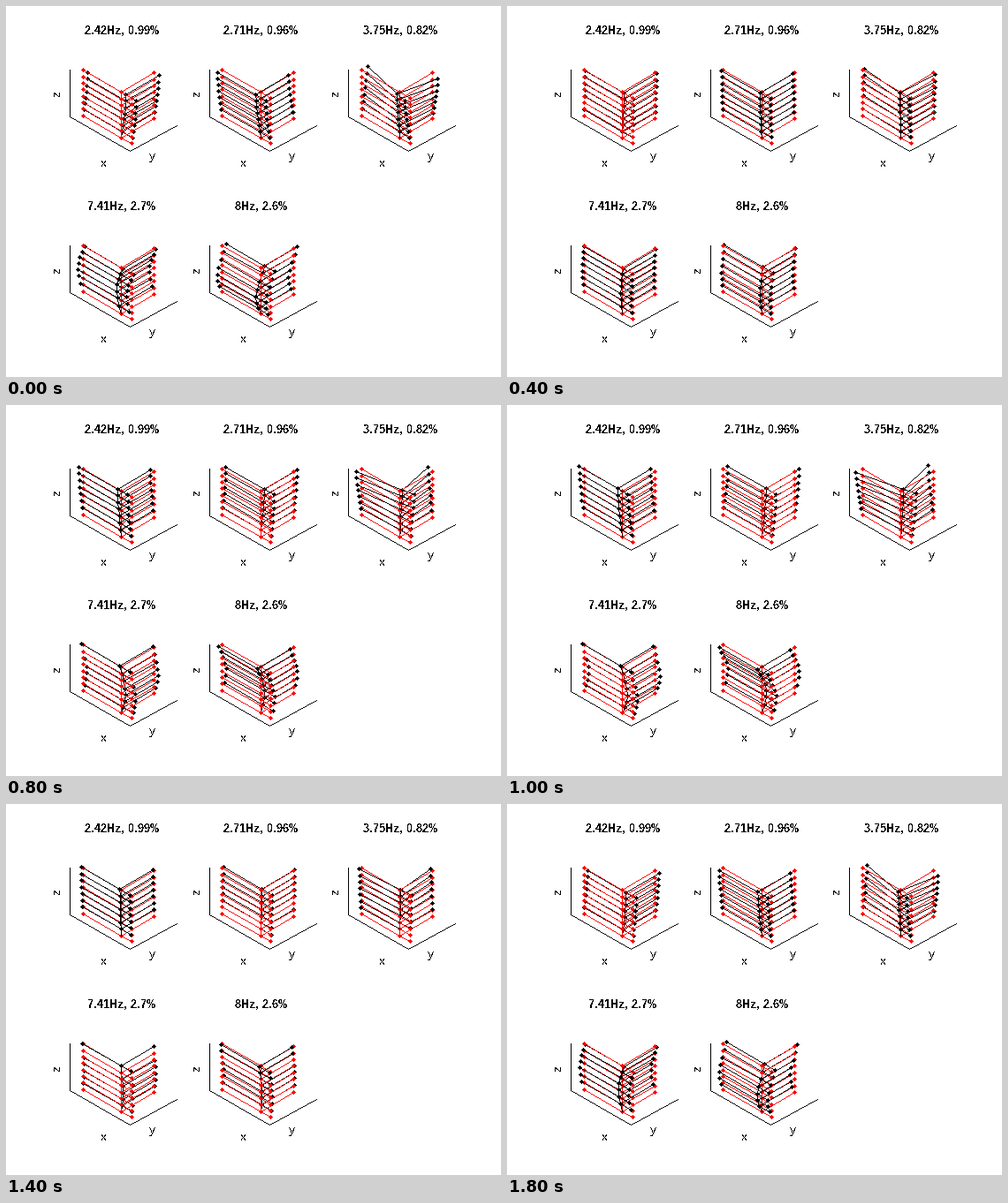
Animation, 560 px wide and 420 px high, one loop 2 s. Source, as a matplotlib script:

```python
import numpy as np
import matplotlib.pyplot as plt
from matplotlib.animation import FuncAnimation

W, H, DPI = 560, 420, 100
FRAMES, INTERVAL = 10, 200
FONT_PX = 13
BLACK, RED = (0, 0, 0), (255, 0, 0)

# Screen vectors of the unit box, first row towards x, then y, then z
ORIGIN = np.array([72, 125])
AXES = np.array([(68, 39), (53, -29), (0, -53)])
ASPECT = 1.29
TOWARDS_VIEWER = np.array([-.61, -.79, 0])

COLUMNS = np.array([(.09, .16), (.73, .16), (.9, .16), (.71, .885)])
TWIST_CENTRE = np.array([.53, .16])
BEAMS = [(0, 1), (1, 2), (1, 3)]
LEVELS = 8
HEIGHT = np.linspace(0, 1, LEVELS)

# title, sway along x, sway along y, twist, half waves over the height
MODES = [
    ("2.42Hz, 0.99%", .08, 0, 0, .45),
    ("2.71Hz, 0.96%", 0, -.1, 0, .45),
    ("3.75Hz, 0.82%", 0, 0, .27, .35),
    ("7.41Hz, 2.7%", -.08, 0, 0, 1.12),
    ("8Hz, 2.6%", 0, -.105, 0, 1.3),
]

plt.rcParams["text.hinting"] = "native"
plt.rcParams["text.hinting_factor"] = 1

fig = plt.figure(figsize=(W / DPI, H / DPI), dpi=DPI, facecolor="white")
ax = fig.add_axes([0, 0, 1, 1])
ax.axis("off")


def pixel(p):
    return np.floor(np.asarray(p) + .5).astype(int)


def draw_line(img, p, q, color):
    """One pixel wide line without smoothing."""
    p, q = pixel(p), pixel(q)
    n = max(abs(q - p).max(), 1)
    x, y = pixel(np.linspace(p, q, n + 1)).T
    img[y, x] = color


def draw_dot(img, p, color):
    x, y = pixel(p)
    for j in range(-2, 3):
        w = 2 - abs(j)
        img[y + j, x - w:x + w + 1] = color


def label(x, y, text, **kw):
    ax.text(x, y, text, fontsize=FONT_PX * 72 / DPI, family="Liberation Sans",
            ha="center", antialiased=False, **kw)


def rest_shape():
    grid = np.zeros((LEVELS, len(COLUMNS), 3))
    grid[..., :2] = COLUMNS
    grid[..., 2] = .975 * HEIGHT[:, None]
    return grid


def mode_shape(sway_x, sway_y, twist, waves):
    """Rigid floors that slide and turn, scaled by a sine over the height."""
    rx, ry = (COLUMNS - TWIST_CENTRE).T
    floor = np.stack([sway_x + twist * ry / ASPECT,
                      sway_y - twist * rx * ASPECT,
                      np.zeros(len(COLUMNS))], axis=1)
    return np.sin(waves * np.pi * HEIGHT)[:, None, None] * floor


def parts(grid):
    """Floor beams, the pieces of the central column, then the sensors."""
    beams = [grid[k, list(b)] for k in range(LEVELS) for b in BEAMS]
    column = [grid[k:k + 2, 1] for k in range(LEVELS - 1)]
    return beams + column + list(grid.reshape(-1, 1, 3))


def draw_part(img, part, origin, color):
    points = origin + part @ AXES
    if len(points) == 2:
        draw_line(img, *points, color)
    else:
        draw_dot(img, points[0], color)


def draw_building(img, origin, shift):
    at_rest, moved = parts(REST), parts(REST + shift)
    near = [(s @ TOWARDS_VIEWER).mean() > 0 for s in parts(shift)]
    for part, front in zip(moved, near):
        if not front:
            draw_part(img, part, origin, BLACK)
    for part in at_rest:
        draw_part(img, part, origin, RED)
    for part, front in zip(moved, near):
        if front:
            draw_part(img, part, origin, BLACK)


REST = rest_shape()
background = np.full((H, W, 3), 255, np.uint8)
panels = []
for n, (title, *mode) in enumerate(MODES):
    row, col = divmod(n, 3)
    origin = ORIGIN + (157.5 * col, 199 * row)
    ox, oy = origin
    x_end = origin + AXES[0]
    for p, q in [(origin, origin + AXES[2]), (origin, x_end),
                 (x_end, x_end + AXES[1])]:
        draw_line(background, p, q, BLACK)
    label(ox + 59, oy - 93, title, weight="bold", va="baseline")
    label(ox + 38.5, oy + 57, "x", va="baseline")
    label(ox + 93.5, oy + 49, "y", va="baseline")
    label(ox - 14, oy - 26, "z", va="center", rotation=90)
    panels.append((origin, mode_shape(*mode)))

picture = ax.imshow(background, extent=(0, W, H, 0), aspect="auto",
                    interpolation="nearest")


def update(i):
    swing = np.cos(2 * np.pi * i / FRAMES)
    img = background.copy()
    for origin, shape in panels:
        draw_building(img, origin, swing * shape)
    picture.set_data(img)
    return [picture]


anim = FuncAnimation(fig, update, frames=FRAMES, interval=INTERVAL,
                     repeat=True, repeat_delay=0, blit=False)
plt.show()
```
